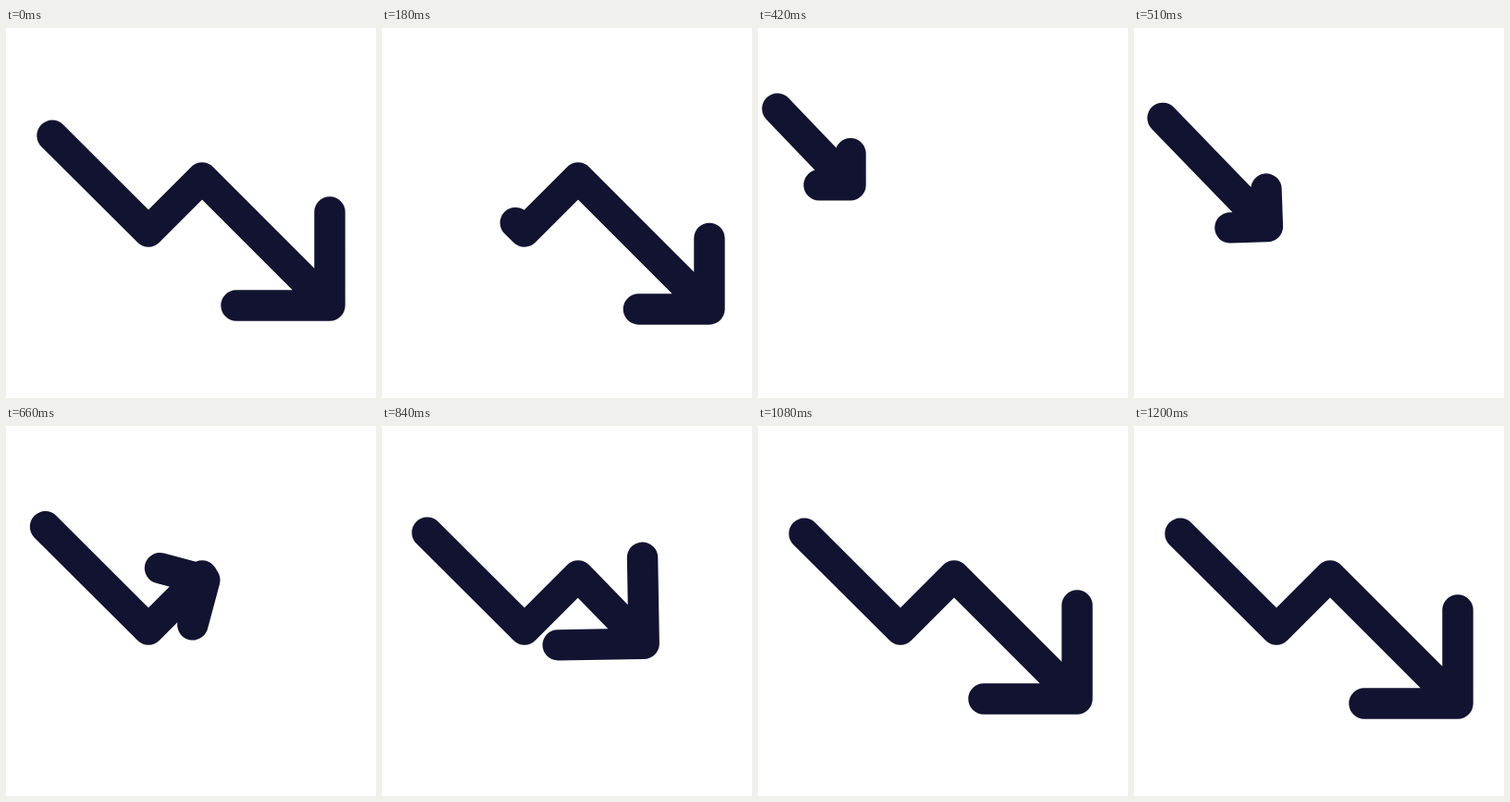
These frames come from a looping animation (400x400 px, 3230 ms). An HTML page:

```html
<!DOCTYPE html>
<html>
<head>
<meta charset="utf-8">
<style>
  html, body { margin: 0; width: 100%; height: 100%; overflow: hidden; background: #fff; }
  svg { display: block; width: 100%; height: 100%; }
  path { fill: none; stroke: #121330; stroke-width: 33.4; stroke-linecap: round; stroke-linejoin: round; }
</style>
</head>
<body>
<svg viewBox="0 0 400 400"><path id="arrow"/></svg>
<script>
const LOOP = 3230, STEP = 30, RETURN = 420, DONE = 1170;
const CORNERS = [154, 212];

// The zigzag's segments all lie at 45 degrees, so x alone fixes a point on it.
const trackY = x => x < 154 ? x + 66.3 : x < 212 ? 374 - x : x - 50;

// time, tip x, drop below the track, head angle, arm length
const KEYS = [
  [420, 100, 3.5, 0, 34],
  [510, 144.4, 3.8, -2, 40.5],
  [585, 181, 2.5, -78, 43],
  [630, 202, 2, -87, 46],
  [660, 214.8, 1.8, -75, 50],
  [720, 237, 2, -25, 64],
  [780, 260, 2, -6, 80],
  [840, 283.2, 2, -1, 93],
  [960, 328.3, 0, 0, 100.5],
  [1080, 345, 0, 0, 101],
  [DONE, 350, 0, 0, 101]
];

// Smooth cubic interpolation of one column
function sample(t, col) {
  const last = KEYS.length - 1;
  if (t >= KEYS[last][0]) return KEYS[last][col];
  const i = KEYS.findIndex(k => k[0] > t) - 1;
  const slope = j => {
    const a = KEYS[Math.max(j - 1, 0)], b = KEYS[Math.min(j + 1, last)];
    return (b[col] - a[col]) / (b[0] - a[0]);
  };
  const [a, b] = [KEYS[i], KEYS[i + 1]];
  const span = b[0] - a[0], u = (t - a[0]) / span, v = 1 - u;
  return a[col] * v * v * (1 + 2 * u) + b[col] * u * u * (1 + 2 * v)
    + span * u * v * (slope(i) * v - slope(i + 1) * u);
}

function pose(t) {
  if (t < RETURN) {
    const s = t / 300;
    const tail = 50 + 213.5 * s ** 1.6, tip = 350 + 17 * s ** 2.86;
    return { tail, tip, drop: 0, angle: 0, arm: 101 - 47.5 * s ** 1.3 };
  }
  const [tip, drop, angle, arm] = [1, 2, 3, 4].map(col => sample(t, col));
  const tail = 50 - (0.0067 * Math.max(0, 994 - t)) ** 2.5;
  return { tail, tip, drop, angle: angle * Math.PI / 180, arm };
}

function draw(t) {
  const { tail, tip, drop, angle, arm } = pose(t);
  const tipY = trackY(tip) + drop;
  const c = arm * Math.cos(angle), s = arm * Math.sin(angle);
  const bends = CORNERS.filter(x => x > tail && x < tip);
  const stem = [tail, ...bends].map(x => [x, trackY(x)]);
  const head = [[tip + s, tipY - c], [tip, tipY], [tip - c, tipY - s]];
  const line = points => 'M' + points.join('L');
  arrow.setAttribute('d', line([...stem, [tip, tipY]]) + line(head));
}

const arrow = document.getElementById('arrow');
const start = performance.now();
function frame() {
  const t = (performance.now() - start) % LOOP;
  draw(Math.floor(t / STEP) * STEP);
  requestAnimationFrame(frame);
}
frame();
</script>
</body>
</html>
```
